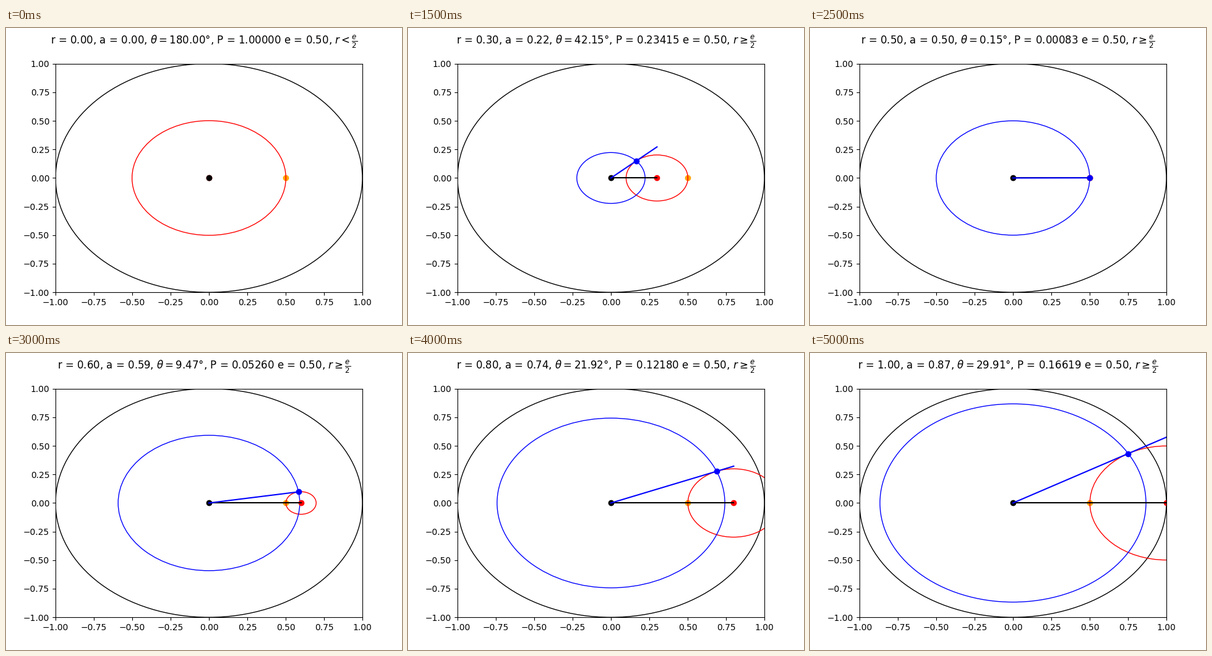
Recreate the animation shown at these times as a matplotlib script. Size 640 px wide and 480 px high, loop 5500 ms.

```python
import numpy as np
import matplotlib.pyplot as plt
from matplotlib.animation import FuncAnimation
from matplotlib.patches import Circle

FRAMES = 11
INTERVAL = 500
E = 0.501309  # distance of the fixed point from the centre

fig, ax = plt.subplots(figsize=(6.4, 4.8), dpi=100)
ax.set_xlim(-1, 1)
ax.set_ylim(-1, 1)
title = fig.suptitle("")


def dot(color):
    return ax.scatter([0], [0], color=color)


def ring(color, radius=1):
    return ax.add_patch(Circle((0, 0), radius, fill=False, color=color))


fixed_dot = dot("orange")
fixed_dot.set_offsets([[E, 0]])
ring("black")
red_ring = ring("red", E)
blue_ring = ring("blue")
red_dot = dot("red")
center_dot = dot("black")
blue_dot = dot("blue")
base_line, = ax.plot([], [], color="black")
tangent_line, = ax.plot([], [], color="blue")


def solve(r):
    """Tangent length and angle from the centre to the red circle."""
    if r < E / 2:
        return 0.0, np.pi
    gap = abs(r - E)
    return np.sqrt(r**2 - gap**2), np.arcsin(gap / r)


def update(i):
    r = i / (FRAMES - 1)
    a, theta = solve(r)
    outside = r >= E / 2

    red_ring.set_center((r, 0))
    red_ring.set_radius(abs(r - E))
    red_dot.set_offsets([[r, 0]])
    base_line.set_data([0, r], [0, 0])

    blue_ring.set_radius(a)
    blue_dot.set_offsets([[a * np.cos(theta), a * np.sin(theta)]])
    tangent_line.set_data([0, r], [0, r * np.tan(theta)])
    for artist in (blue_ring, blue_dot, tangent_line):
        artist.set_visible(outside)

    sign = r"\geq" if outside else "<"
    title.set_text(
        rf"r = {r:.2f}, a = {a:.2f}, $\theta = {np.degrees(theta):.2f}$°, "
        rf"P = {theta / np.pi:.5f} e = {E:.2f}, $r {sign} \frac{{e}}{{2}}$"
    )
    return title, red_ring, red_dot, base_line, blue_ring, blue_dot, tangent_line


anim = FuncAnimation(fig, update, frames=FRAMES, interval=INTERVAL,
                     repeat=True, repeat_delay=0)
plt.show()
```
